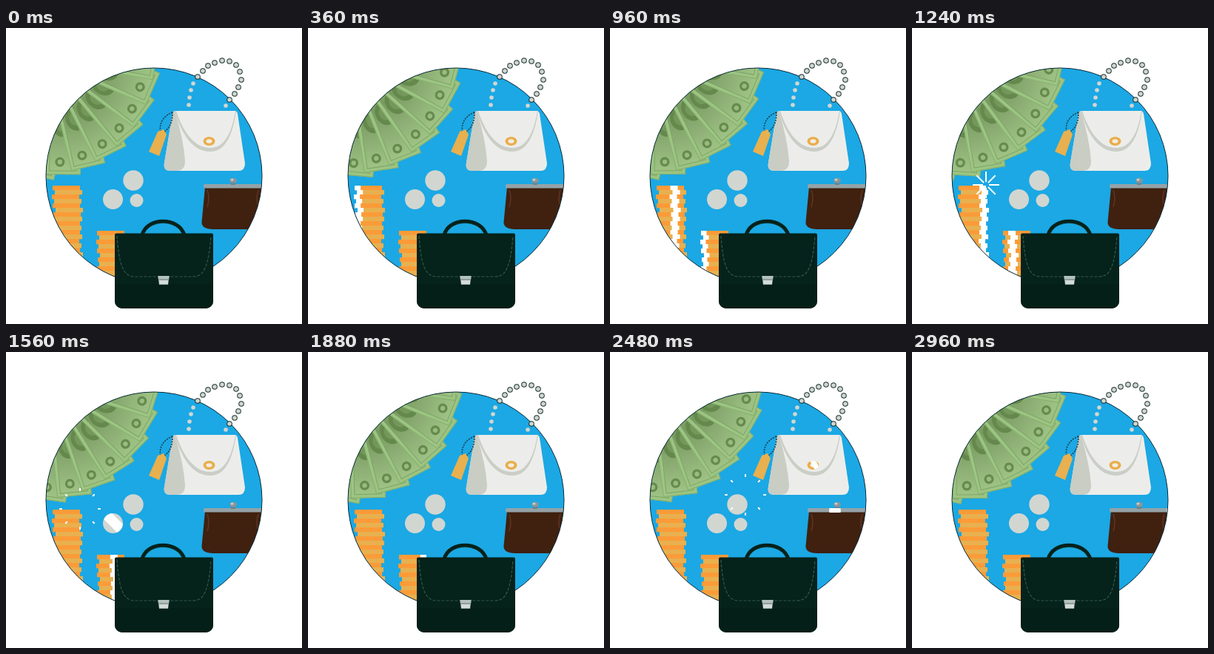
Recreate the animation shown at these times as an HTML page with a canvas. Size 400 px wide and 400 px high, loop 3000 ms.

```html
<!DOCTYPE html>
<html lang="en">
<head>
<meta charset="utf-8">
<style>
html, body { margin: 0; width: 100%; height: 100%; overflow: hidden; background: #fff; }
canvas { display: block; width: 400px; height: 400px; }
</style>
</head>
<body>
<canvas id="stage" width="400" height="400"></canvas>
<script>
const g = document.getElementById('stage').getContext('2d');
const LOOP = 3000, STEP = 40, TAU = Math.PI * 2, RAD = Math.PI / 180;
const ORANGE = '#fb9b38', GOLD = '#e8b04f', GREY = '#d2d6d1', DARK = '#05221b';

function fill(path, color) {
  g.fillStyle = color;
  g.fill(path);
}

function line(path, color, width, dash = []) {
  g.strokeStyle = color;
  g.lineWidth = width;
  g.setLineDash(dash);
  g.stroke(path);
  g.setLineDash([]);
}

function oval(x, y, rx, ry = rx) {
  const p = new Path2D();
  p.ellipse(x, y, rx, ry, 0, 0, TAU);
  return p;
}

function box(x, y, w, h, r = 0) {
  const p = new Path2D();
  p.roundRect(x, y, w, h, r);
  return p;
}

function clipped(path, draw) {
  g.save();
  g.clip(path);
  draw();
  g.restore();
}

// White band inside a shape; x, y is the band's centre.
function shine(path, x, y, width, tilt = 0) {
  clipped(path, () => {
    g.translate(x, y);
    g.rotate(tilt);
    g.fillStyle = '#fff';
    g.fillRect(-width / 2, -100, width, 200);
  });
}

const disc = oval(200, 200, 146);

// Banknotes, a wheel of them turning about a point near the corner
const noteFill = g.createLinearGradient(15, 0, 150, 0);
noteFill.addColorStop(0, '#a2c48b');
noteFill.addColorStop(.45, '#789a60');
noteFill.addColorStop(.75, '#8fb177');
noteFill.addColorStop(1, '#a0c486');

function note(angle) {
  g.save();
  g.translate(50, 48);
  g.rotate(angle * RAD);
  g.translate(135, 0);
  g.rotate(10 * RAD);
  g.translate(-135, 0);
  fill(box(12, -28, 140, 47), '#9cc583');
  line(box(12.5, -27.5, 139, 46), '#86ad6b', 1);
  fill(box(17, -23, 130, 37), noteFill);
  line(box(17, -23, 130, 37), '#7ea366', 1);
  fill(oval(84, -3, 17, 14), '#65894c');
  fill(oval(84, -3, 10, 9), '#74975b');
  fill(oval(135, 0, 6.5), '#668b4e');
  fill(oval(135, 0, 3.2), '#98bb7e');
  g.restore();
}

function notes(t) {
  const gap = 40 / 3;
  for (let n = 7; n >= -2; n--) note(13.6 + gap * (n + t % 1000 / 1000));
}

// Stacks of coins with a band of light running across
const shifts = [0, 3, -1, 2, 0, 4, 1, 3, 0, 2];

function stack(x, y, count, light) {
  for (let i = 0; i < count; i++) {
    const dx = shifts[i % shifts.length];
    const slab = box(x + dx, y + i * 6, 37, 6.2);
    fill(slab, i % 2 ? GOLD : ORANGE);
    shine(slab, light + dx - 1, y, 10);
  }
}

function coin(x, y, r, t, start) {
  const c = oval(x, y, r);
  fill(c, GREY);
  const p = (t - start) / 440;
  if (p > 0 && p < 1) {
    const d = (p * 2 - 1) * r * 1.6;
    shine(c, x + d * .7, y - d * .7, r, -Math.PI / 4);
  }
}

function star(x, y, t, start) {
  const p = (t - start) / 600;
  if (p <= 0 || p >= 1) return;
  const outer = 28 * (1 - (1 - p) ** 2), inner = 28 * p ** 2.1;
  const rays = new Path2D();
  for (let i = 0; i < 8; i++) {
    const a = i * Math.PI / 4, cx = Math.cos(a), sy = Math.sin(a);
    rays.moveTo(x + cx * inner, y + sy * inner);
    rays.lineTo(x + cx * outer, y + sy * outer);
  }
  line(rays, '#fff', 2);
}

const pearls = [247, 104, 248, 94, 250, 84, 253, 75, 259, 66, 266, 58, 273, 51, 282, 47, 292, 44,
  302, 45, 311, 50, 316, 59, 318, 70, 314, 80, 309, 89, 302, 97, 297, 105];
const bag = new Path2D('M229 112H309Q312 112 313 116L323 183Q323 193 314 193H222Q212 193 214 182L225 116Q226 112 229 112Z');
const bagSide = new Path2D('M228 112Q240 150 242 180Q242 193 230 193H222Q212 193 214 182L225 116Z');
const flapShade = new Path2D('M228 112C238 146 253 167 276 167C296 167 306 146 311 112Z');
const flap = new Path2D('M230 112C240 142 255 162 276 162C295 162 305 142 310 112Z');
const tag = new Path2D('M193 167L205 140L213 137L217 144L207 173Z');
const strings = new Path2D('M209 140C206 128 214 118 225 114M214 140C223 134 225 124 225 114');

function handbag(t) {
  for (let i = 0; i < pearls.length; i += 2) {
    const x = pearls[i], y = pearls[i + 1];
    if (i >= 8 && i <= 30) fill(oval(x, y, 3.8), '#17302d');
    fill(oval(x, y, 2.8), GREY);
  }
  fill(bag, '#ecedea');
  fill(bagSide, '#c9cdc4');
  fill(flapShade, '#cacec6');
  fill(flap, '#ecedea');
  const clasp = oval(274.5, 153, 8, 6);
  fill(clasp, '#e9ad4b');
  fill(oval(274.5, 153, 4, 2.8), '#f2eee2');
  if (t > 2060 && t < 2700) shine(clasp, 268 + (t - 2120) * .026, 153, 7, -.5);

  line(strings, '#173a4a', 1.5, [2, 1.5]);
  fill(tag, GOLD);
  const p = (t - 1920) / 440;
  if (p > 0 && p < 1) shine(tag, 190 + 34 * p, 173 - 44 * p, 13, -Math.PI / 4);
}

const purse = new Path2D('M269 215H350V272H280Q264 272 264.500 262Z');
const frame = box(267, 211, 90, 5.500, 2);
const rim = new Path2D('M267 212H350V217H271L269 232L265 236Z');

function wallet(t) {
  fill(purse, '#40200f');
  line(new Path2D('M272 219Q276 230 272 242M341 219Q337 230 341 242'), '#5f3520', 1.5);
  fill(frame, '#94a3a8');
  fill(box(304, 207, 6, 5), '#6f8289');
  fill(oval(307, 206, 5, 3.500), '#87979c');
  fill(oval(305.500, 205, 2, 1.500), '#c5d0d2');
  const x = 272 + (t - 2160) * .1;
  shine(frame, x, 214, 15);
  shine(rim, x, 214, 15);
}

const seam = new Path2D('M150 281C152 308 155 326 164 333Q168 336 174 336H252Q259 336 264 332C272 324 275 306 277 281');

function briefcase() {
  line(new Path2D('M184 280C190 255 234 255 241 280'), DARK, 5);
  line(new Path2D('M187 278C194 259 230 259 238 278'), '#24483d', .8, [2, 2]);
  fill(box(147, 277.500, 133, 101.500, [2, 2, 10, 10]), DARK);
  fill(box(147, 346, 133, 33, [0, 0, 10, 10]), '#041e18');
  line(seam, '#31594a', 1.2, [4, 2]);
  fill(new Path2D('M205 335H221L219 347H207Z'), '#8f9f9b');
  fill(box(206, 335, 14, 4), '#b4c1bd');
  fill(box(207, 341, 12, 5), '#d3dcd8');
}

function draw(t) {
  g.fillStyle = '#fff';
  g.fillRect(0, 0, 400, 400);
  fill(disc, '#1ba8e4');
  clipped(disc, () => {
    notes(t);
    stack(63, 213, 17, 78 + (t - 680) * .034);
    stack(123, 274, 11, 136 + (t - 1240) * .034);
    coin(144.5, 231.5, 13.5, t, 1320);
    coin(172, 206, 13.7, t, 1920);
    coin(176.5, 233, 9, t, 1900);
    wallet(t);
  });
  line(disc, '#0b2a38', 1);
  handbag(t);
  star(100, 212, t, 1000);
  star(183, 193, t, 1920);
  briefcase();
}

const begin = performance.now();
function tick() {
  const t = (performance.now() - begin) % LOOP;
  draw(Math.floor(t / STEP) * STEP);
  requestAnimationFrame(tick);
}
tick();
</script>
</body>
</html>
```
